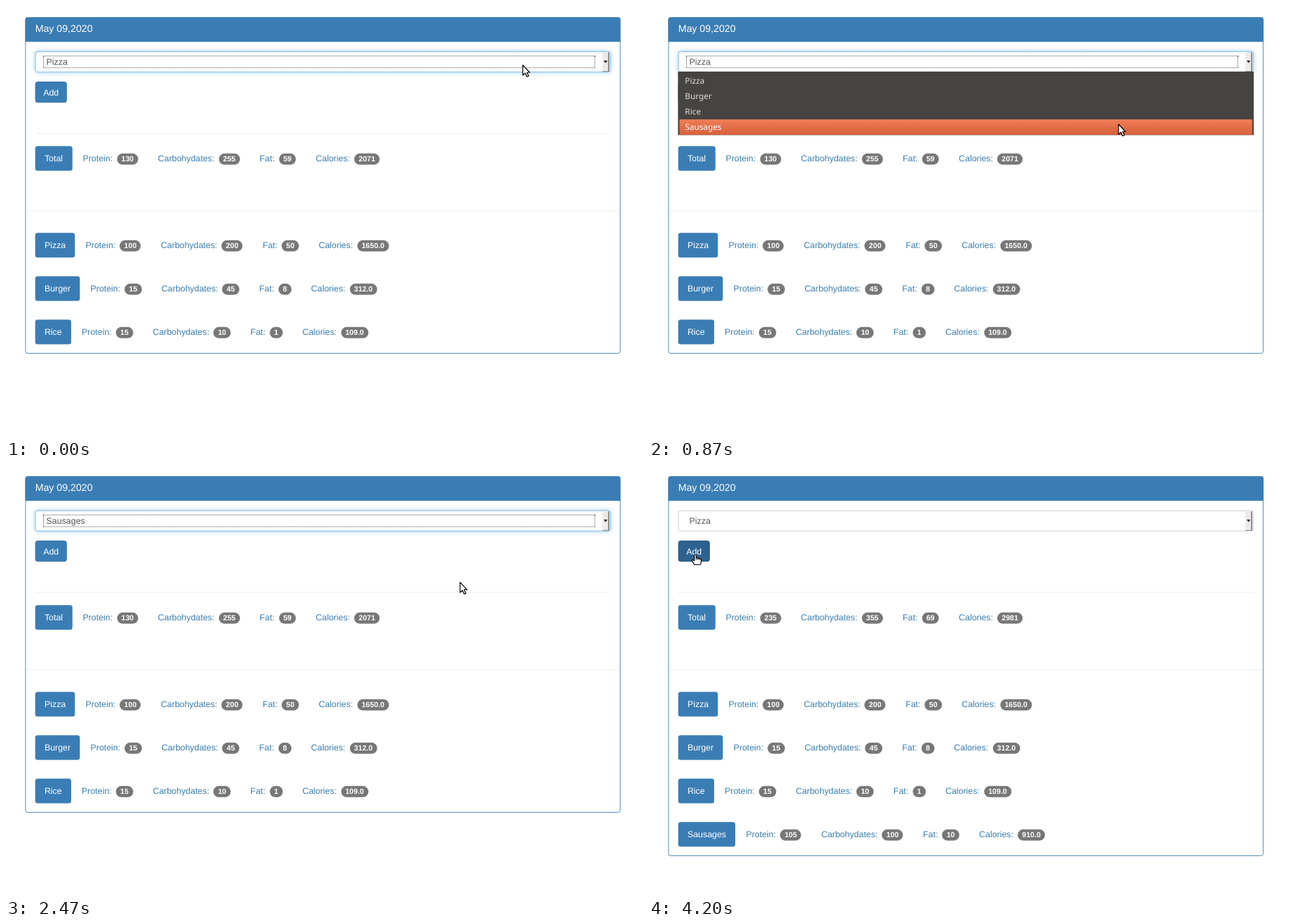
Recreate the animation shown at these times as an HTML page. Size 909x616 px, loop 4.59 s.

```html
<!DOCTYPE html>
<html lang="en">
<head>
<meta charset="utf-8">
<title>Food diary</title>
<style>
* { box-sizing: border-box; }
html, body { margin: 0; width: 100%; height: 100%; overflow: hidden; background: #fff; }
#page {
  position: absolute; left: 0; top: 0; width: 1026px; height: 695px;
  transform: scale(.8857); transform-origin: 0 0;
  font: 14px/20px "Liberation Sans", Arial, sans-serif;
  text-rendering: geometricPrecision; white-space: nowrap;
}
#page > * { position: absolute; }
#panel { left: 31px; top: 18px; width: 958.5px; border: 1px solid #3a7db5; border-radius: 4px; }
#title {
  left: 31px; top: 18px; width: 958.5px; height: 39.6px; padding: 0 16px;
  background: #3a7db5; color: #fff; border-radius: 4px 4px 0 0;
  font-size: 16px; line-height: 39.6px;
}
#field {
  left: 47px; top: 72.8px; width: 926.5px; height: 34px; padding: 0 17px;
  border: 1px solid #ccc; border-radius: 4px; color: #555; line-height: 32px;
}
#ring { left: 59.5px; top: 79.5px; width: 889px; height: 20.5px; border: 1px dotted #333; }
#drop {
  left: 960.5px; top: 74.5px; width: 11.8px; height: 31.5px; background: #ece9e8;
  border: solid #858585; border-width: 0 2px 1.5px 0;
}
#drop::after {
  content: ""; position: absolute; left: 2.2px; top: 13.5px;
  border: 3.5px solid transparent; border-top: 4px solid #111; border-bottom: 0;
}
#add {
  left: 47px; top: 121.8px; height: 34px; padding: 0 12px; line-height: 32px;
  border: 1px solid #2e6da4; border-radius: 4px; background: #3a7db5; color: #fff;
}
#add.hover { background: #2d6290; border-color: #204d74; }
#add.down { background: #24517a; border-color: #122b40; box-shadow: inset 0 3px 5px rgba(0,0,0,.125); }
.line { height: 1px; background: #eaeaea; }
.row { left: 47px; display: flex; color: #3a7db0; }
.row span { height: 40px; padding: 10px 15px; margin-left: 2px; }
.row span:first-child { margin: 0; background: #3a7db5; color: #fff; border-radius: 4px; }
.row b {
  display: inline-block; min-width: 10px; margin-left: 3px; padding: 3px 7px;
  border-radius: 10px; background: #777; color: #fff;
  font-size: 12px; line-height: 1; text-align: center; vertical-align: middle;
}
#menu {
  left: 46.5px; top: 106px; width: 927px; height: 102px; padding: 1px;
  background: #454440; border: 1px solid #3a3935; color: #dfdbd2;
  font: 13.3px/25px "Noto Sans", "Open Sans", sans-serif;
}
#menu div { height: 25px; padding-left: 9.5px; }
#menu .on { background: linear-gradient(#ef7d57, #d6603a); color: #fff; }
#pointer { position: absolute; left: 0; top: 0; overflow: visible; }
#pointer path { fill: #fff; stroke: #000; stroke-width: 1.2; stroke-linejoin: round; }
</style>
</head>
<body>
<div id="page">
  <div id="panel"></div>
  <div id="title">May 09,2020</div>
  <div id="field"></div>
  <div id="ring"></div>
  <div id="drop"></div>
  <div id="add">Add</div>
  <div class="line" style="left:47px;top:205px;width:926.5px"></div>
  <div class="line" style="left:32px;top:330px;width:956.5px"></div>
</div>
<svg id="pointer" width="20" height="20">
  <path id="arrow" d="M.5 .5V15L3.9 11.9L6.4 17.3L8.8 16.2L6.4 11H10.4Z"/>
  <g id="hand">
    <path d="M-1.3 8V1.4Q-1.2 0 0 0T1.3 1.4V5Q2.6 4.2 3.6 5.4Q5 4.8 5.9 6Q8.4 5.6 8.4 8V11Q8.2 13 7 14.5H-1.2Q-2 12.6-4.6 9.6Q-5.4 8-4 7.6Q-2.6 7.6-1.3 9Z"/>
    <path d="M1.3 5V8M3.6 5.4V8M5.9 6V8" style="fill:none;stroke-width:.8"/>
  </g>
</svg>
<script>
const LOOP = 4590, TICK = 1000 / 15;
const OPEN = 1, CLOSE = 23, PRESS = 58, RELEASE = 60, SAVED = 61;
const labels = ["Protein", "Carbohydates", "Fat", "Calories"];
const foods = [
  ["Pizza", 100, 200, 50, 1650],
  ["Burger", 15, 45, 8, 312],
  ["Rice", 15, 10, 1, 109],
  ["Sausages", 105, 100, 10, 910]
];
// Pointer stops: tick, x, y
const stops = [
  [0, 737, 84], [6, 737, 84], [7, 708, 122], [8, 680, 150], [13, 669.5, 168.5],
  [36, 669.5, 168.5], [44, 156, 138], [46, 156, 138], [47, 145, 133], [52, 66, 128], [69, 66, 128]
];

const $ = id => document.getElementById(id);
const page = $("page");
const show = (el, on) => el.style.display = on ? "" : "none";

function addRow(name, top) {
  const row = document.createElement("div");
  row.className = "row";
  row.style.top = top + "px";
  row.innerHTML = `<span>${name}</span>` + labels.map(l => `<span>${l}: <b></b></span>`).join("");
  page.append(row);
  return row;
}

function fill(row, values) {
  row.querySelectorAll("b").forEach((b, i) => b.textContent = values[i]);
}

const total = addRow("Total", 226);
const rows = foods.map(([name, ...v], i) => {
  const row = addRow(name, 366 + 70 * i);
  v[3] = v[3].toFixed(1);
  fill(row, v);
  return row;
});

const menu = document.createElement("div");
menu.id = "menu";
menu.innerHTML = foods.map(f => `<div>${f[0]}</div>`).join("");
page.append(menu);

function pointerAt(tick) {
  const i = Math.max(1, stops.findIndex(s => s[0] >= tick));
  const [t0, x0, y0] = stops[i - 1], [t1, x1, y1] = stops[i];
  const k = Math.max(0, (tick - t0) / (t1 - t0)), e = k * k * (3 - 2 * k);
  return [x0 + (x1 - x0) * e, y0 + (y1 - y0) * e];
}

function draw(ms) {
  const tick = Math.floor((ms + 5) / TICK);
  const [x, y] = pointerAt(tick);
  const overAdd = x < 87 && y < 138;
  const saved = tick >= SAVED;

  $("pointer").style.transform = `translate(${x}px,${y}px)`;
  show($("arrow"), !overAdd);
  show($("hand"), overAdd);

  // The highlight trails the pointer by one tick
  const hot = Math.min(3, Math.max(0, Math.floor((pointerAt(tick - 1)[1] - 95) / 22.2)));
  show(menu, tick >= OPEN && tick < CLOSE);
  [...menu.children].forEach((el, i) => el.className = i === hot ? "on" : "");

  const focus = Math.min(1, Math.max(0, (SAVED - tick) / (SAVED - PRESS)));
  const mix = (a, b) => a + (b - a) * focus;
  const field = $("field");
  field.textContent = foods[tick >= CLOSE && !saved ? 3 : 0][0];
  field.style.borderColor = `rgb(${mix(204, 102)},${mix(204, 175)},${mix(204, 233)})`;
  field.style.boxShadow =
    `inset 0 1px 1px rgba(0,0,0,.075), 0 0 8px rgba(102,175,233,${.6 * focus})`;
  show($("ring"), tick < PRESS);

  $("add").className = tick >= PRESS && tick < RELEASE ? "down" : overAdd ? "hover" : "";

  const eaten = saved ? foods : foods.slice(0, 3);
  fill(total, labels.map((_, i) => eaten.reduce((sum, f) => sum + f[i + 1], 0)));
  show(rows[3], saved);
  $("panel").style.height = 333 + 70 * eaten.length + "px";
}

const start = performance.now();
function loop() {
  draw((performance.now() - start) % LOOP);
  requestAnimationFrame(loop);
}
loop();
</script>
</body>
</html>
```
